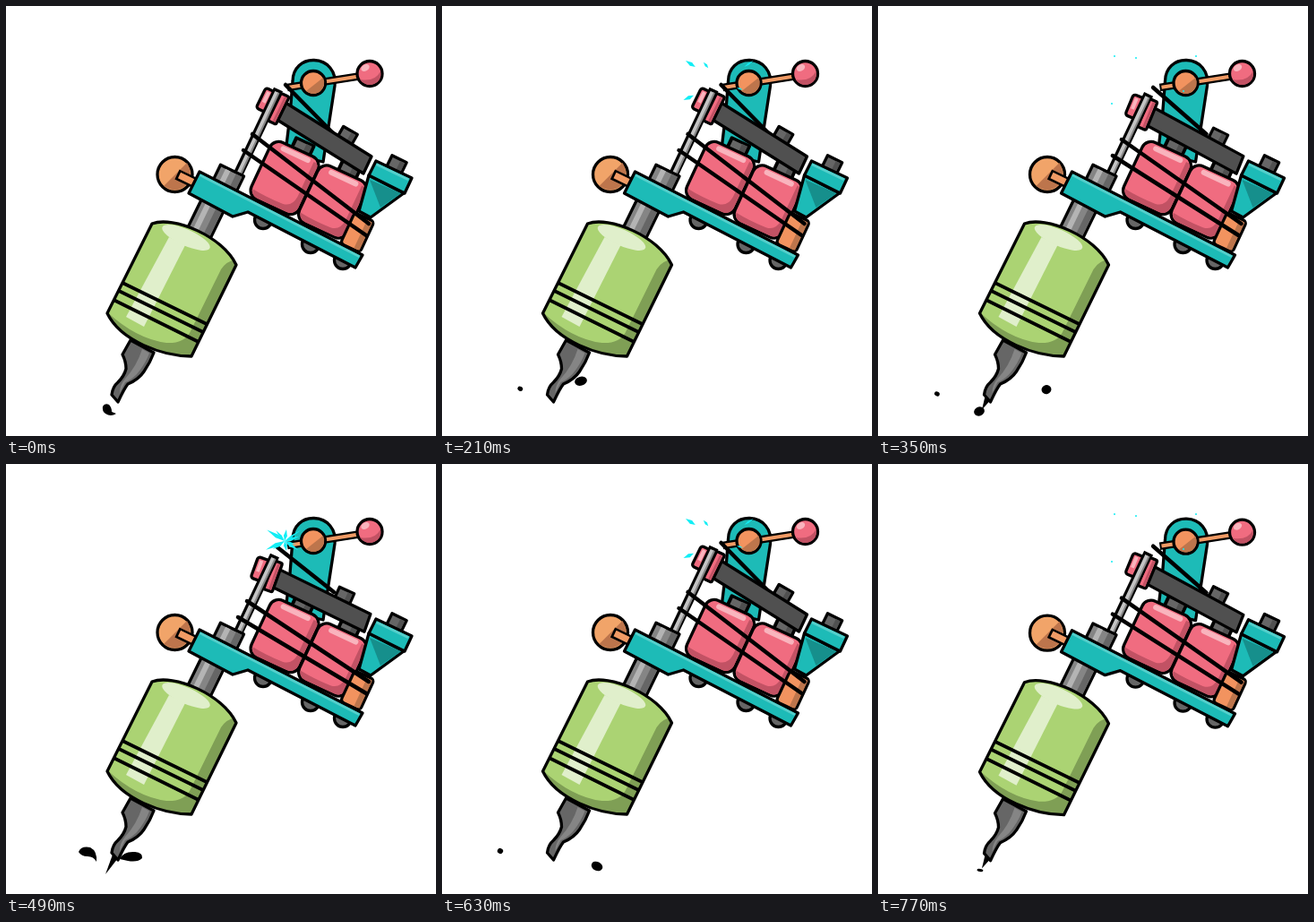
An HTML page that plays this animation: 480x480 px, repeating every 0.84 s.

```html
<!DOCTYPE html>
<html lang="en">
<head>
<meta charset="utf-8">
<title>Tattoo machine</title>
<style>
  html, body { margin: 0; width: 100%; height: 100%; overflow: hidden; background: #fff; }
  svg { display: block; width: 100%; height: 100%; }
  .line { stroke: #000; stroke-width: 3.300; stroke-linejoin: round; }
  .cord { stroke: #000; stroke-width: 4.500; fill: none; stroke-linecap: round; }
  .teal { fill: #1dbbb7; } .tealDark { fill: #168f8c; } .tealLight { fill: #55cfcb; }
  .pink { fill: #f06c80; } .pinkDark { fill: #c25264; } .pinkLight { fill: #f9b4bd; }
  .orange { fill: #f2935f; } .orangeDark { fill: #bd754c; }
  .green { fill: #abd373; } .greenDark { fill: #7f9f55; } .greenLight { fill: #e0efcb; }
  .gray { fill: #858585; } .grayMid { fill: #666; } .grayDark { fill: #505050; } .grayLight { fill: #b4b4b4; }
</style>
</head>
<body>
<svg viewBox="0 0 480 480">
  <defs>
    <clipPath id="gripClip"><path id="gripShape" d="M163 243C187 234 242 257 257 289L207 391C175 391 128 374 113 343Z"/></clipPath>
    <g id="coil">
      <rect class="pink line" x="-29.500" y="-35" width="59" height="70" rx="11"/>
      <path class="pinkDark" d="M28-26V24Q27 33 18 33.500H-18Q-26 33-27 26Q-10 28 10 27Q21 26 22 13V-30Q28-30 28-26Z"/>
      <rect class="pinkLight" x="-18" y="-32" width="36" height="6" rx="3"/>
    </g>
    <g id="nut">
      <rect class="grayMid line" x="-9" y="-7" width="18" height="14"/>
      <path class="grayDark" d="M2-5.500H7.500V5.500H2Z"/>
    </g>
  </defs>

  <g id="machine">
    <path class="teal line" d="M320 84C320 69 331 60 344 60.500C359 61 369 73 367 89L354 174L312 164L317 122Z"/>

    <path d="M314 91L397 78" stroke="#000" stroke-width="8.500"/>
    <path d="M316 90.700L397 78" stroke="#f19b65" stroke-width="4"/>
    <circle class="orange line" cx="343" cy="86" r="13.500"/>
    <path class="orangeDark" d="M354 80Q358 89 350 96Q343 100 335 95Z"/>
    <circle class="pink line" cx="406" cy="75.500" r="14"/>
    <path class="pinkDark" d="M418 73Q420 83 411 87Q401 90 395 82Q412 85 418 73Z"/>
    <ellipse class="pinkLight" cx="401" cy="69" rx="5" ry="3.500" transform="rotate(-30 401 69)"/>

    <use href="#nut" transform="translate(331 158) rotate(25) scale(1.200 1)"/>
    <use href="#nut" transform="translate(383 183) rotate(25) scale(1.200 1)"/>

    <path id="spring" class="cord"/>
    <g id="armature">
      <use href="#nut" transform="translate(381 145) rotate(30)"/>
      <path class="grayDark line" d="M309 106L408 168L399 187L301 126Z"/>
      <g transform="translate(297 109) rotate(26)">
        <rect class="pink line" x="-14" y="-13" width="16" height="25" rx="3"/>
        <rect class="pinkLight" x="-11" y="-10" width="4" height="13"/>
        <rect class="pink line" x="4" y="-15" width="10" height="34" rx="2"/>
        <path class="pinkDark" d="M9-13H12V17H9Z"/>
      </g>
    </g>

    <g class="grayMid line">
      <circle cx="287" cy="239" r="9.500"/><circle cx="340" cy="266" r="9.500"/><circle cx="376" cy="284" r="9.500"/>
    </g>
    <use href="#coil" transform="translate(311 192) rotate(25)"/>
    <use href="#coil" transform="translate(364.500 218.500) rotate(25)"/>

    <use href="#nut" transform="translate(436 177) rotate(26)"/>
    <path class="teal line" d="M405 189L444 209L407 236L394 229Z"/>
    <path class="tealDark" d="M406 194L441 209L418 225Z"/>
    <path class="teal line" d="M413 173L453 192L445 209L405 189Z"/>
    <path class="tealLight" d="M414 175.500L450 192.500L448.500 195L413 178Z"/>

    <g transform="translate(393 251) rotate(25)">
      <rect class="orange line" x="-12" y="-17" width="24" height="38" rx="4"/>
      <path class="orangeDark" d="M4-15H10.500V19H4Z"/>
    </g>

    <g id="rod">
      <path d="M304 93L258 190" stroke="#000" stroke-width="11"/>
      <path d="M302.500 96L258 191" stroke="#c4c4c4" stroke-width="5"/>
      <path d="M304.500 97L260 192" stroke="#858585" stroke-width="2"/>
    </g>
    <path id="cords" class="cord"/>

    <g transform="translate(249 192) rotate(26)">
      <rect class="gray line" x="-15" y="-9" width="29" height="22"/>
      <path class="grayLight" d="M-8-7.500H-2V10H-8Z"/><path class="grayMid" d="M5-7.500H12.500V10H5Z"/>
    </g>
    <g transform="translate(223 238) rotate(26)">
      <rect class="gray line" x="-14" y="-18" width="28" height="36"/>
      <path class="grayLight" d="M-8-17H-2V17H-8Z"/><path class="grayMid" d="M5-17H12.500V17H5Z"/>
    </g>

    <circle cx="188.500" cy="188" r="19.500" class="line" fill="#f1a469"/>
    <path class="orangeDark" d="M202 175Q210 189 201 200Q190 210 176 201Z"/>
    <path d="M191 188L214 199" stroke="#000" stroke-width="12"/>
    <path d="M193.500 189L214 199" stroke="#f19b65" stroke-width="7"/>

    <path class="teal line" d="M216 185L398 278L390 292L270 230L253 235L204 209Z"/>
    <path class="tealLight" d="M217 187.500L395 278.500L394 281L216 190Z"/>

    <use href="#gripShape" class="green"/>
    <g clip-path="url(#gripClip)">
      <path class="greenDark" d="M260 283Q247 283 240 294L205 365Q198 377 179 376Q145 372 111 340L120 400H220Z"/>
      <path class="greenLight" d="M182 258L200 267L154 358L134 347Z"/>
      <ellipse class="greenLight" cx="201" cy="258.500" rx="29" ry="9" transform="rotate(24 201 258.500)"/>
      <path class="cord" style="stroke-width:3.800" d="M130 309L226 356M126 318L222 365M120 328L217 376"/>
    </g>
    <use href="#gripShape" class="line" fill="none"/>

    <path id="needle"/>
    <path class="grayMid line" d="M139 373L165 387Q161 398 154 408Q148 417 136 422Q132 427 125 442L118 434Q119 425 125 420Q132 413 134 405Q134 397 130 389Z"/>
    <path class="gray" d="M152 383L160 387.500Q156 399 146 411Q139 418 133 420L127 432Q127 423 133 416Q146 402 152 383Z"/>
  </g>
  <g id="ink"></g>
  <g id="sparks" fill="#12eef5"></g>
</svg>

<script>
const FRAME = 70, FRAMES = 12;
const el = id => document.getElementById(id);
const quad = (a, b, c, s) => a + b * s + c * s * s;
const blob = (x, y, rx, ry = rx, turn = 0) =>
  `<ellipse cx="${x}" cy="${y}" rx="${rx}" ry="${ry}" transform="rotate(${turn} ${x} ${y})"/>`;

// Small vibration of the whole machine, one offset per step
const shakeX = [0, 0, -.5, -.5, -1, .5, 0, 0, 0, -.5, 0, .5];
const strokes = [0, 1, .6]; // needle raised, fully down, returning

const spark = { x: 311, y: 86 };
const rays = [[-47, -30, 2.2], [-23, -28, 1.5], [44, -30, 1], [30, 9, 1], [-50, 23, 2.2]];
const spans = [null, [0, .42], [.4, .72], [.6, .83], [.85, .96], [.97, 1]];

function sliver(dx, dy, from, to, width) {
  const len = Math.hypot(dx, dy), nx = -dy / len * width, ny = dx / len * width;
  const at = (f, side = 0) => `${spark.x + dx * f + nx * side} ${spark.y + dy * f + ny * side}`;
  const mid = from + (to - from) * .45;
  return `<path d="M${at(from)}L${at(mid, 1)}L${at(to)}L${at(mid, -1)}Z"/>`;
}

function drawSparks(phase) {
  if (!phase) return '';
  const [from, to] = spans[phase];
  if (phase === 5) return rays.map(([x, y]) => blob(spark.x + x, spark.y + y, 1)).join('');
  const slivers = rays.map(([x, y, w]) => sliver(x, y, from, to, phase === 4 ? .9 : w));
  if (phase === 1) {
    slivers.push(...[[2, -13], [-13, 9], [2, 11], [16, -5], [15, 10]].map(([x, y]) => sliver(x, y, 0, 1, 2)));
  }
  return slivers.join('');
}

function drawInk(k) {
  let out = '';
  if (k >= 1 && k <= 5) {
    const s = k - 1;
    out += blob(108.7 - 10.7 * s, quad(447, -16.2, 3.17, s), s < 2 ? 5 : 3, s < 2 ? 4.5 : 2.5, 30);
    out += blob(quad(118, 19.5, -.5, s), quad(452, -27.3, 5.33, s), s < 4 ? 7 : 5.5, 5, -15);
  } else if (k >= 8 && k <= 10) {
    const s = k - 7;
    out += blob(91 - 13 * s, quad(435, -4.5, 1.5, s), s < 2 ? 5 : 3.2, 3, 30);
    out += blob(139 + 17 * s, quad(438, .5, 2.5, s), s < 2 ? 9 : 6.5, 5, 25);
  } else if (k === 7) {
    out += '<path d="M81 433Q84 426 94 428Q102 432 101 444Q98 438 91 438Q84 438 81 433Z"/>';
    out += '<path d="M127 441Q131 432 144 433Q153 434 152 440Q147 445 136 443Z"/>';
  }
  if (k === 0 || k === 6) out += '<path d="M108 447Q110 443 115 445Q118 448 118 453L123 455Q117 459 111 455Q107 452 108 447Z"/>';
  if (k === 2) out += '<path d="M104 448Q112 452 119 448Q117 457 111 457Q107 455 104 448Z"/>';
  if (k === 5) out += blob(113, 452.5, 6, 5, -20);
  if (k === 11) out += blob(114, 453.5, 3.5, 1.5, 10);
  return out;
}

let shown = -1;
function draw(now) {
  const k = Math.floor(now / FRAME) % FRAMES;
  if (k !== shown) {
    shown = k;
    const t = strokes[k % 3], dx = -6 * t, dy = 10 * t;
    el('machine').setAttribute('transform', `translate(${shakeX[k]} ${k === 11 ? .7 : 0})`);
    el('armature').setAttribute('transform', `rotate(${-6 * t} 402 178)`);
    el('spring').setAttribute('d', `M${312 - 9 * t} ${88 + 5 * t}L366 143`);
    el('rod').setAttribute('transform', `translate(${-4 * t} ${9 * t})`);
    el('cords').setAttribute('d',
      `M${275 + dx} ${143 + dy}L405 243M${265 + dx} ${161 + dy}L402 256`);
    el('needle').setAttribute('d', `M119 436L125 440L${122 - 11 * t} ${440 + 18 * t}Z`);
    el('ink').innerHTML = drawInk(k);
    el('sparks').innerHTML = drawSparks(k % 6);
  }
  requestAnimationFrame(draw);
}
draw(performance.now());
</script>
</body>
</html>
```
